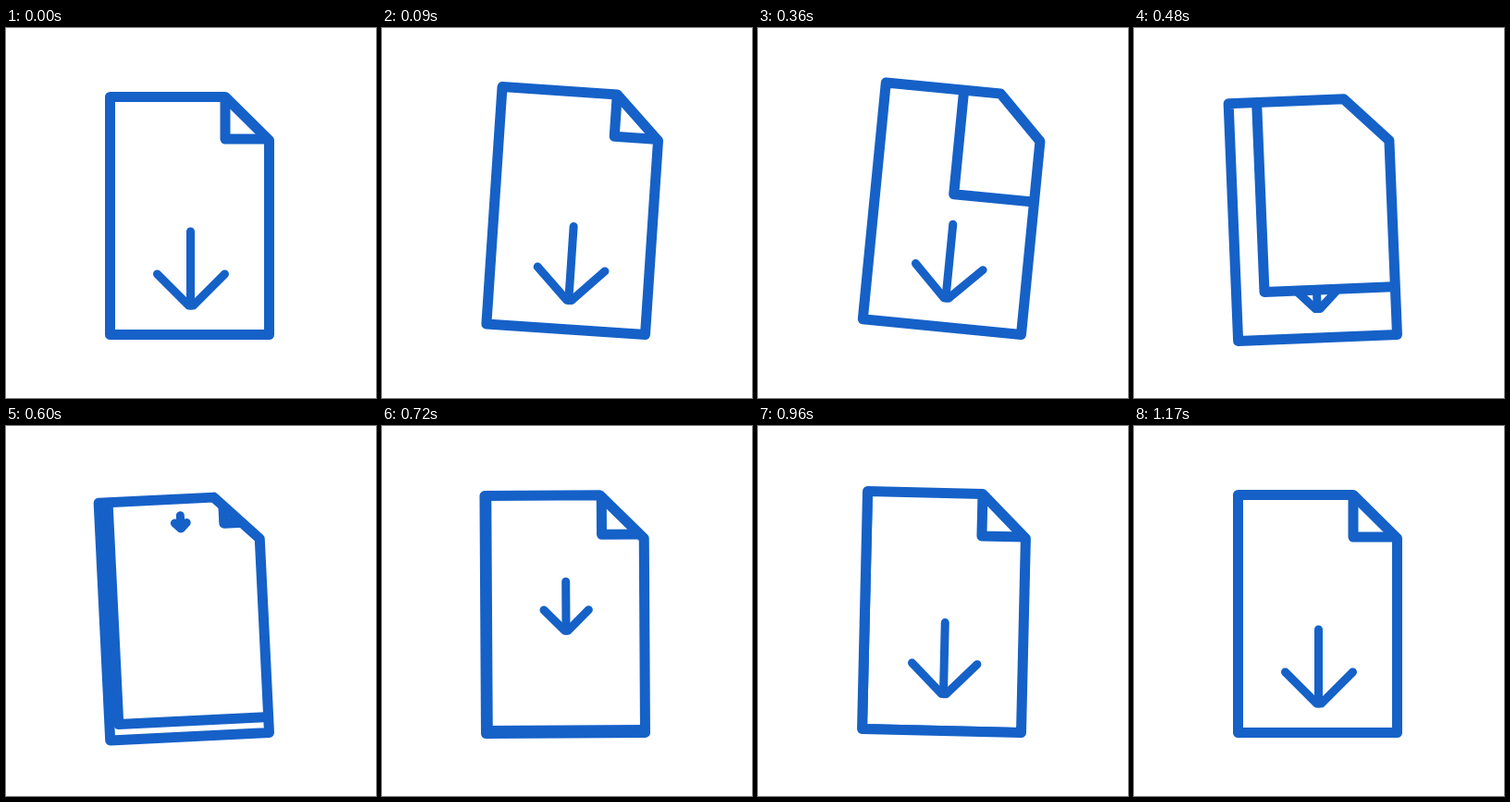
These frames come from a looping animation (400x400 px, 3260 ms). An HTML page with a canvas:

```html
<!DOCTYPE html>
<html lang="en">
<head>
<meta charset="utf-8">
<title>Document download</title>
<style>
  html, body { margin: 0; width: 100%; height: 100%; overflow: hidden; background: #fff; }
  canvas { display: block; }
</style>
</head>
<body>
<canvas id="stage" width="400" height="400"></canvas>
<script>
const ctx = document.getElementById('stage').getContext('2d');
const LOOP = 3260, STEP = 30, LAST = 39;
const BLUE = '#1561c8';
const LEFT = 112.5, TOP = 74.5, RIGHT = 284.5, BOTTOM = 331.5;
const FOLD = { x: 237, y: 120 };
const TRAVEL = { x: LEFT - FOLD.x, y: BOTTOM - FOLD.y };
const PAGE = [[LEFT, TOP], [237, TOP], [RIGHT, 121.5], [RIGHT, BOTTOM], [LEFT, BOTTOM]];

// Cubic easing with handles (x1, 0) and (x2, 1), between steps a and b
function ease(t, a, b, x1 = 0.33, x2 = 0.1) {
  const u = Math.min(1, Math.max(0, (t - a) / (b - a)));
  if (u === 0 || u === 1) return u;
  let lo = 0, hi = 1, s;
  for (let i = 0; i < 24; i++) {
    s = (lo + hi) / 2;
    const r = 1 - s;
    if (3 * r * r * s * x1 + 3 * r * s * s * x2 + s ** 3 < u) lo = s; else hi = s;
  }
  return s * s * (3 - 2 * s);
}
const smooth = (t, a, b) => ease(t, a, b, 1 / 3, 2 / 3);

// Swing about the bottom right corner, in degrees
const tilt = t => 6.7 * ease(t, 0, 9.5) - 9.7 * ease(t, 10.8, 18.8)
  + 4.8 * smooth(t, 18.8, 28.5) - 1.8 * smooth(t, 28.5, 39);

function trace(points, closed) {
  ctx.beginPath();
  points.forEach(p => ctx.lineTo(...p));
  if (closed) ctx.closePath();
}

function line(points, width, closed) {
  trace(points, closed);
  ctx.lineWidth = width;
  ctx.stroke();
}

function arrow(scale) {
  if (scale <= 0) return;
  const tip = 300 - 235 * (1 - scale);
  const at = (x, y) => [200 + x * scale, tip + y * scale];
  line([at(-0.5, -80), at(-0.5, 0)], 9);
  line([at(-36.5, -34), at(-2.5, 0), at(2.5, 0), at(36.5, -34)], 9);
}

// Turned-over corner, shifted along its travel by a share of the whole way
function fold(share) {
  const x = FOLD.x + TRAVEL.x * share, y = FOLD.y + TRAVEL.y * share;
  if (y < TOP - 10) return;
  ctx.fillRect(x, 0, 400 - x, y);
  line([[x, 0], [x, y], [400, y]], 11);
}

function draw(t) {
  ctx.setTransform(1, 0, 0, 1, 0, 0);
  ctx.fillStyle = '#fff';
  ctx.fillRect(0, 0, 400, 400);
  ctx.strokeStyle = BLUE;
  ctx.lineCap = ctx.lineJoin = 'round';
  ctx.translate(RIGHT, BOTTOM);
  ctx.rotate(tilt(t) * Math.PI / 180);
  ctx.translate(-RIGHT, -BOTTOM);

  const turn = ease(t, 7.5, 27.5);
  ctx.save();
  trace(PAGE, true);
  ctx.clip();
  arrow(1);
  fold(turn);
  arrow(ease(t, 16.2, 37.7));
  fold(turn - 1);
  ctx.restore();
  line(PAGE, 11, true);
}

const start = performance.now();
function tick() {
  const ms = (performance.now() - start) % LOOP;
  draw(Math.min(LAST, Math.floor(ms / STEP)));
  requestAnimationFrame(tick);
}
tick();
</script>
</body>
</html>
```
